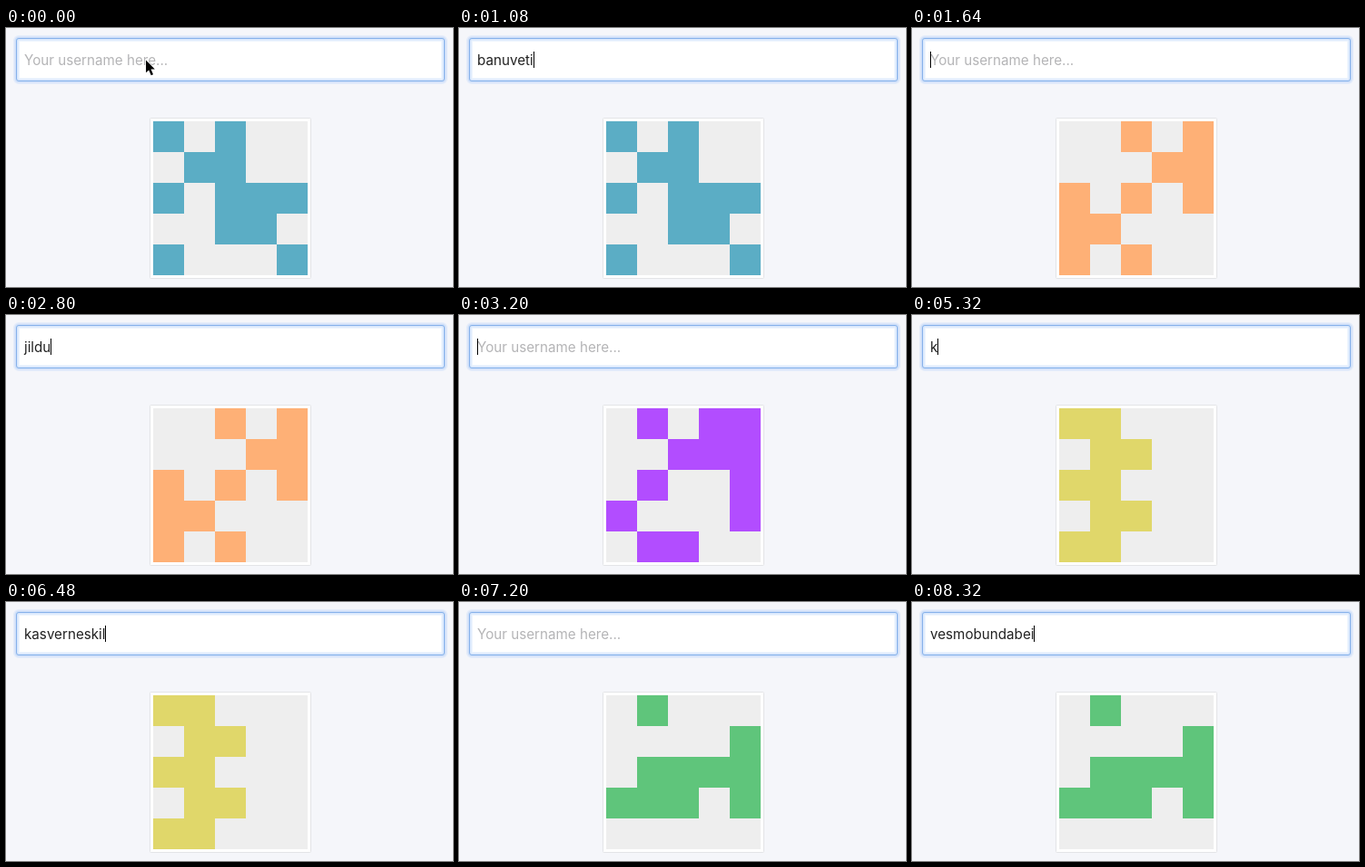
An HTML page that plays this animation: 492x286 px, repeating every 8400 ms.

```html
<!DOCTYPE html>
<html lang="en">
<head>
<meta charset="utf-8">
<title>Username avatar</title>
<style>
  html, body { margin: 0; width: 100%; height: 100%; overflow: hidden; background: #f5f6fa; }
  svg { display: block; width: 492px; height: 286px; }
  text { font: 400 15.2px Inter, "Open Sans", sans-serif; }
</style>
</head>
<body>
<svg viewBox="0 0 492 286">
  <rect width="492" height="286" fill="#f5f6fa"/>
  <g fill="none" stroke="#7fb0f5">
    <rect x="11.5" y="11.5" width="471" height="47" rx="2.5" fill="#fff" stroke="none"/>
    <rect x="11.5" y="11.5" width="471" height="47" rx="2.5" stroke-width="7" stroke-opacity=".14"/>
    <rect x="11.5" y="11.5" width="471" height="47" rx="2.5" stroke-width="4" stroke-opacity=".2"/>
    <rect x="11.5" y="11.5" width="471" height="47" rx="2.5" stroke="#86b1ea"/>
  </g>
  <text id="hint" x="20" y="41" fill="#b4b4b6">Your username here...</text>
  <text id="typed" x="20" y="41" fill="#222"></text>
  <rect id="caret" y="26" width="1" height="18" fill="#000"/>
  <rect x="158.5" y="99.5" width="177" height="177" rx="1" fill="#fff" stroke="#e3e4e7"/>
  <rect x="162" y="103" width="170" height="170" fill="#eee"/>
  <path id="avatar" shape-rendering="crispEdges"/>
  <path id="pointer" d="M154 35.5V49.3L157.2 46.4L159.7 52.3L162 51.3L159.5 45.6H163.8Z"
        fill="#000" stroke="#fff" stroke-width="1.2" paint-order="stroke"/>
</svg>
<script>
const LOOP = 8400, LEFT = 20, CELL = 34;
const $ = id => document.getElementById(id);
const [hint, typed, caret, avatar, pointer] =
  ["hint", "typed", "caret", "avatar", "pointer"].map($);

// Evenly spaced key presses
const run = (start, count, gap = 80) => Array.from({ length: count }, (_, i) => start + i * gap);

// keys: time of each letter; off: spans in which the caret is hidden
const scenes = [
  { start: 0, color: "#5badc5", rows: "10100 01100 10111 00110 10001",
    word: "banuvetidon", keys: [120, ...run(400, 5), ...run(1000, 5)],
    off: [[0, 120], [320, 400], [960, 1000], [1520, 1640]] },
  { start: 1640, color: "#feb076", rows: "00101 00011 10101 11000 10100",
    word: "jildumo", keys: [...run(2400, 3, 40), 2680, 2800, 3000, 3040],
    off: [[1840, 2040], [2240, 2400]] },
  { start: 3200, color: "#b24dff", rows: "01011 00111 01001 10001 01100",
    word: "gavtomledo", keys: run(3800, 10),
    off: [[3400, 3600]] },
  { start: 4640, color: "#e0d76a", rows: "11000 01100 11000 01100 11000",
    word: "kasverneskilo", keys: [5320, 5440, 5480, ...run(5720, 7), 6440, 6480, 6560],
    off: [[4840, 5040], [5240, 5320], [5680, 5720], [6400, 6440]] },
  { start: 6640, color: "#5fc57b", rows: "01000 00001 01111 11101 00000",
    word: "vesmobundabei", keys: [...run(7320, 5), 7680, ...run(7840, 7)],
    off: [[6840, 7040], [7200, 7320]] }
];

const gridPath = rows => rows.split(" ").map((row, y) =>
  [...row].map((bit, x) => bit === "1"
    ? `M${162 + x * CELL} ${103 + y * CELL}h${CELL}v${CELL}h${-CELL}z` : "").join("")).join("");

const show = (el, visible) => el.setAttribute("visibility", visible ? "visible" : "hidden");

function draw(t) {
  const scene = scenes.findLast(s => t >= s.start);
  const count = scene.keys.filter(k => t >= k).length;
  typed.textContent = scene.word.slice(0, count);
  const width = count ? typed.getComputedTextLength() : 0;
  caret.setAttribute("x", Math.round(LEFT + width));
  avatar.setAttribute("d", gridPath(scene.rows));
  avatar.setAttribute("fill", scene.color);
  show(hint, count === 0);
  show(caret, !scene.off.some(([from, to]) => t >= from && t < to));
  show(pointer, t < 120);
}

function tick() {
  draw(performance.now() % LOOP);
  requestAnimationFrame(tick);
}
tick();
</script>
</body>
</html>
```
